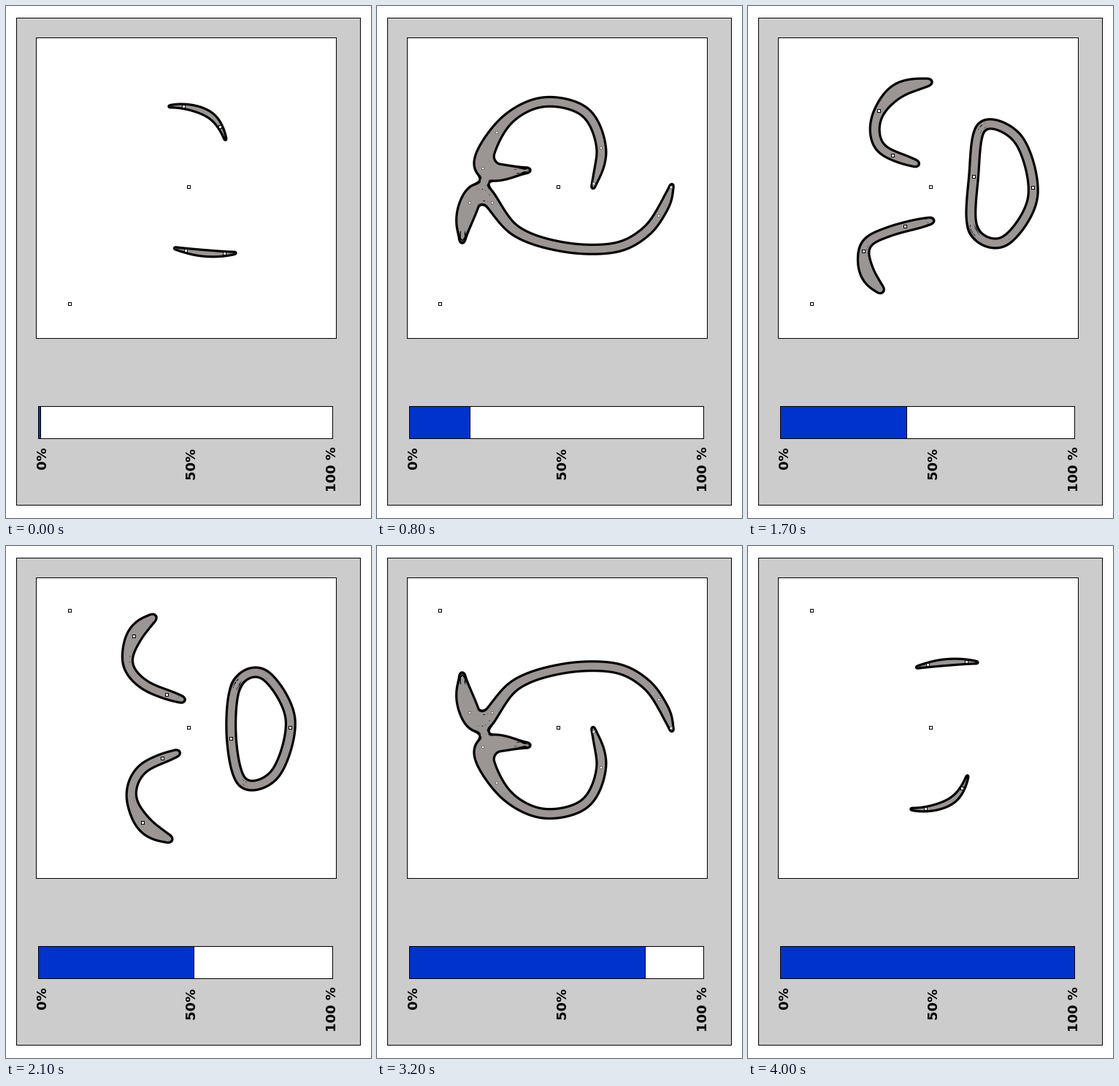
Animation, 500 px wide and 700 px high, one loop 4.1 s. Source, as an HTML page with a canvas:

```html
<!DOCTYPE html>
<html lang="en">
<head>
<meta charset="utf-8">
<title>Slices</title>
<style>
  html, body { margin: 0; width: 100%; height: 100%; overflow: hidden; background: #fff; }
  svg, canvas { position: absolute; left: 0; top: 0; display: block; }
  rect { stroke: #000; stroke-width: 1; }
  text { font: bold 18px "DejaVu Sans", sans-serif; }
</style>
</head>
<body>
<svg width="500" height="700">
  <rect x="14.5" y="16.5" width="471" height="666" fill="#ccc"/>
  <rect x="41.5" y="43.5" width="411" height="411" fill="#fff"/>
  <rect x="44.5" y="547.5" width="403" height="44" fill="#fff"/>
  <rect id="bar" x="44.5" y="547.5" width="3" height="44" fill="#03c"/>
  <text transform="translate(54.5 635) rotate(-90)">0%</text>
  <text transform="translate(258.5 649) rotate(-90)">50%</text>
  <text transform="translate(450.5 665) rotate(-90)">100 %</text>
</svg>
<canvas id="view" width="500" height="455"></canvas>
<script>
const STEP = 100, STEPS = 41, LAST = STEPS - 1, MIDDLE = LAST / 2;
const GROWN = 8, LOOPED = 13;
const W = 500, H = 455, AXIS = 496;
const WIDTH = 8, OUTLINE = 3.2, SPREAD = 1.7;
const ctx = document.getElementById('view').getContext('2d');
const bar = document.getElementById('bar');

// Key points of the two strands, grown and then looped, and of the final hook
const upperA = [[295,249], [307,195], [284,144], [225,131], [172,161], [145,222], [209,224]];
const upperB = [[273,300], [310,230], [300,120], [230,119], [183,152], [172,198], [225,219]];
const lowerA = [[404,243], [393,273], [368,308], [325,330], [255,329], [188,306], [142,252], [121,284], [116,323]];
const lowerB = [[300,112], [378,165], [393,262], [338,323], [273,306], [200,311], [148,308], [134,340], [143,369]];
const hook = [[214,90], [184,113], [169,155], [189,191], [239,214]];

const lerp = (a, b, s) => a + (b - a) * s;
const clamp = n => Math.max(0, Math.min(1, n));
const ease = s => s * s * (3 - 2 * s);
const mirror = ([x, y]) => [x, AXIS - y];
const blend = (a, b, s) => a.map((p, i) => p.map((n, j) => lerp(n, b[i][j], s)));
const bell = (v, mid) => Math.exp(-(((v - mid) / .14) ** 2));

const ringStart = [...upperB.slice(0, 3), ...lowerB.slice(1, 4)];
const lowHookStart = lowerB.slice(4).reverse();
const ring = ringStart.map((_, i) => {
  const a = (130 + 60 * i) * Math.PI / 180;
  return [349 + 41 * Math.cos(a) - 11 * Math.sin(a) ** 2, 247 + 79 * Math.sin(a)];
});

// Catmull-Rom point at index u
function at(pts, u, closed) {
  const n = pts.length;
  const i = Math.min(Math.floor(u), closed ? n - 1 : n - 2), f = u - i;
  const get = j => pts[closed ? (j + n) % n : Math.max(0, Math.min(n - 1, j))];
  const [a, b, c, d] = [get(i - 1), get(i), get(i + 1), get(i + 2)];
  return b.map((p, j) => p + f / 2 * (c[j] - a[j]
    + f * (2 * a[j] - 5 * p + 4 * c[j] - d[j] + f * (3 * (p - c[j]) + d[j] - a[j]))));
}

// Dots [x, y, radius]; radius(v, g) takes the place within the piece and on the whole curve
function trace(pts, radius, closed = false, from = 0, to = 1) {
  const end = closed ? pts.length : pts.length - 1, n = 240, dots = [];
  for (let i = 0; i <= n; i++) {
    const g = lerp(from, to, i / n);
    dots.push([...at(pts, g * end, closed), radius(i / n, g)]);
  }
  return dots;
}

const taper = (v, r, start, end) =>
  lerp(start, lerp(end, r, ease(clamp((1 - v) / .12))), ease(clamp(v / .12)));

// A sliver that lengthens into a strand, whose head then bends round to close a loop
function strand(a, b, from, to, k) {
  const e = Math.pow(clamp(k / GROWN), .7);
  const s = clamp((k - GROWN) / (LOOPED - GROWN));
  const radius = (v, g) => {
    const belly = WIDTH + lerp(7, 2.5, s) * bell(g, .84);
    return lerp(3 + 3 * Math.sin(Math.PI * v), taper(v, belly, lerp(4, 14, s), 5), e);
  };
  const swing = a === lowerA ? 38 * Math.sin(Math.PI * s) : 0;
  const pts = blend(a, b, s).map(([x, y], i) =>
    [x + swing * Math.max(0, 1 - i / 4) - 3 * (1 - e), y + 6 * (1 - e)]);
  return trace(pts, radius, false, lerp(from, 0, e), lerp(to, 1, e));
}

function slices(k) {
  const marks = [];
  const mark = (dots, ...vs) => vs.forEach(v => marks.push(dots[Math.round(v * (dots.length - 1))]));
  if (k <= LOOPED) {
    const s = clamp(k / GROWN);
    const parts = [strand(upperA, upperB, .22, .5, k), strand(lowerA, lowerB, .39, .54, k)];
    for (const p of parts) {
      mark(p, lerp(.8, .7, s), lerp(.8, .83, s));
      if (k < LOOPED - 2) mark(p, lerp(.2, .03, s), lerp(.2, .17, s));
    }
    return { parts, marks };
  }
  const s = (k - LOOPED) / (MIDDLE - LOOPED);
  const radius = v => taper(v, WIDTH + (2 + 3 * s) * bell(v, .25), 6, 6);
  const hooks = [
    trace(blend(upperB.slice(2), hook, s), radius),
    trace(blend(lowHookStart, hook.map(mirror), s), radius)
  ];
  const loop = trace(blend(ringStart, ring, 1 - (1 - s) ** 2), () => WIDTH, true);
  for (const h of hooks) mark(h, lerp(.75, .2, s), lerp(.75, .9, s));
  mark(loop, 1 / 6, 23 / 36);
  return { parts: [...hooks, loop], marks };
}

// Adds one soft disc per dot, so that strands flow together where they meet
function stamp(field, dots) {
  dots.forEach(([x, y, r], i) => {
    const [px, py] = dots[i ? i - 1 : 1];
    const R = r * SPREAD, weight = Math.hypot(x - px, y - py) / R * 15 / 16;
    for (let j = Math.ceil(y - R); j <= y + R; j++) {
      for (let c = Math.ceil(x - R); c <= x + R; c++) {
        const q = 1 - ((c - x) ** 2 + (j - y) ** 2) / (R * R);
        if (q > 0) field[j * W + c] += weight * q * q;
      }
    }
  });
}

function paint(parts) {
  const field = new Float32Array(W * H);
  for (const dots of parts) stamp(field, dots);
  // Across a lone strand this is the distance from its spine, relative to the disc radius
  const depth = field.map(f => f <= 0 ? 1 : f >= 1 ? 0 : Math.sqrt(1 - Math.pow(f, .4)));
  const img = ctx.createImageData(W, H);
  const slope = (i, d) => Math.max(Math.abs(depth[i] - depth[i - d]), Math.abs(depth[i] - depth[i + d]));
  for (let i = W; i < W * (H - 1); i++) {
    if (depth[i] > .9) continue;
    const inside = (1 / SPREAD - depth[i]) / (Math.hypot(slope(i, 1), slope(i, W)) + 1e-6);
    const fill = clamp(inside - OUTLINE + .5);
    img.data.set([155 * fill, 149 * fill, 148 * fill, 255 * clamp(inside + .5)], i * 4);
  }
  ctx.putImageData(img, 0, 0);
}

function box(x, y, size, color) {
  ctx.fillStyle = '#fff';
  ctx.strokeStyle = color;
  x = Math.round(x - size / 2) + .5;
  y = Math.round(y - size / 2) + .5;
  ctx.fillRect(x, y, size, size);
  ctx.strokeRect(x, y, size, size);
}

function draw(k) {
  const flipped = k >= MIDDLE;
  const phase = flipped ? LAST - k : k;
  const crisp = phase === 0 || phase > LOOPED;
  const place = ([x, y, r]) => [x, flipped ? AXIS - y : y, r];
  const { parts, marks } = slices(phase);

  bar.setAttribute('width', 3 + 10 * k);
  paint(parts.map(dots => dots.map(place)));
  for (const [x, y] of marks.map(place)) box(x, y, crisp ? 4 : 3, crisp ? '#000' : '#777');
  box(crisp ? 250 : 248, flipped ? 248 : 247, 4, '#000');
  box(crisp ? 87 : 86, flipped ? 88 : 407, 4, '#000');
}

let shown = -1;
function tick() {
  const k = Math.floor(performance.now() / STEP) % STEPS;
  if (k !== shown) draw(shown = k);
  requestAnimationFrame(tick);
}
tick();
</script>
</body>
</html>
```
